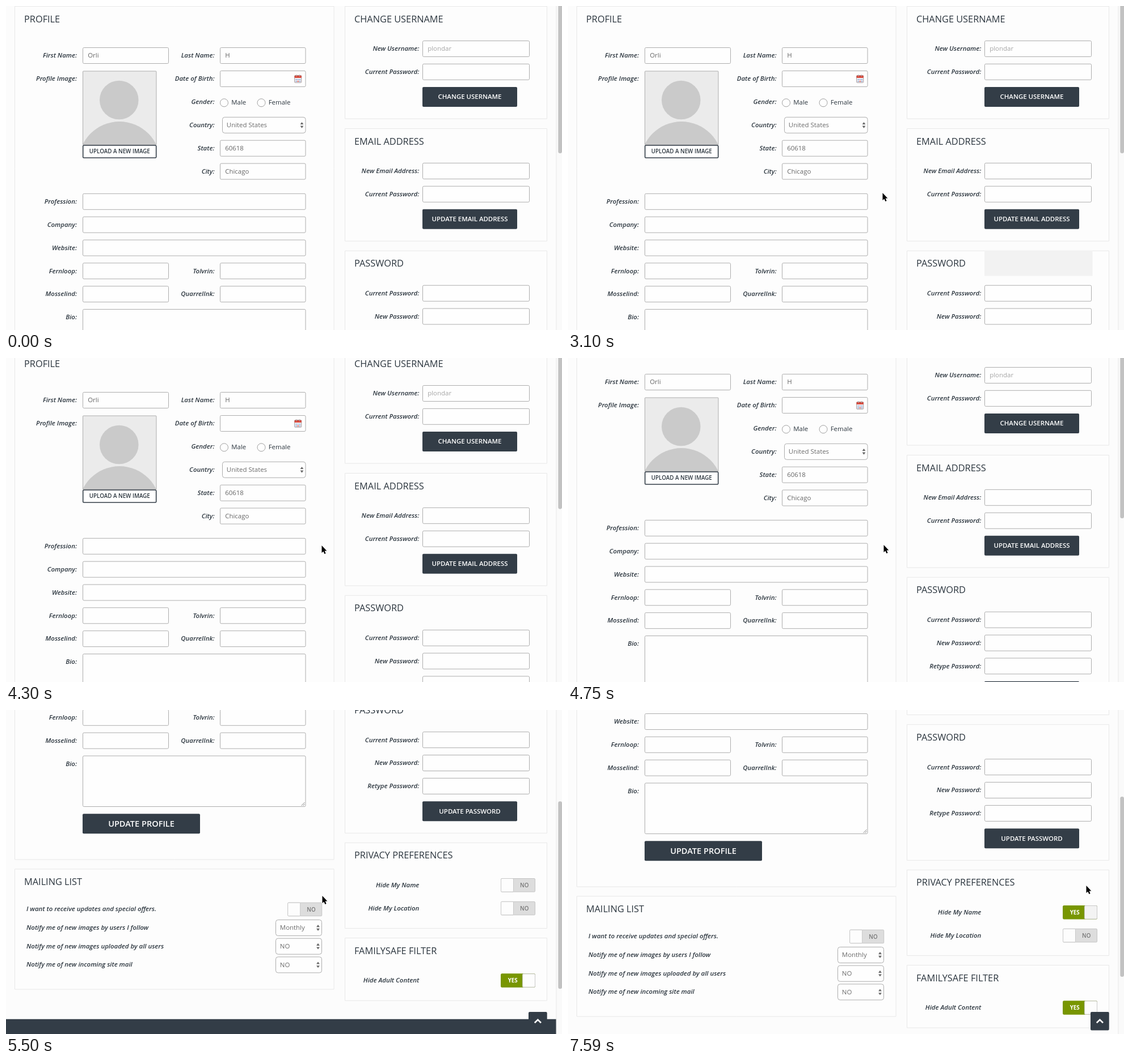
Write an HTML page with a canvas that moves like this. It is 980 px wide and 572 px high and loops after 8 s.

```html
<!DOCTYPE html>
<html lang="en">
<head>
<meta charset="utf-8">
<title>Account settings</title>
<style>
html, body { margin: 0; width: 980px; height: 572px; overflow: hidden; background: #fcfcfc; }
canvas { display: block; }
</style>
</head>
<body>
<canvas id="stage" width="980" height="572"></canvas>
<script>
const ctx = document.getElementById('stage').getContext('2d');
const LOOP = 8000;
const FONT = '"Open Sans", "Noto Sans", sans-serif';
const INK = '#2b353e', DARK = '#333d47', LINE = '#adadad', PANEL = '#e8e8e8', GREEN = '#789600';
const BODY = 11.44, PITCH = 40.85;

// time, pointer x, pointer y, scroll
const poses = [
  [0, -50, -50, 0],
  [450, 905, 460, 0], [600, 735, 400, 0], [750, 440, 352, 0], [900, 147, 291, 0],
  [1050, 136, 80, 0], [1200, 288, 188, 0], [1340, 440, 250, 0], [1480, 535, 300, 0],
  [1630, 628, 250, 0], [1780, 668, 200, 0], [1920, 691, 170, 0], [2060, 800, 110, 0],
  [2210, 910, 76, 0], [2350, 700, 260, 0], [2500, 400, 350, 0], [2650, 542, 301, 0],
  [2800, 547, 312, 0], [2950, 552, 324, 0], [3100, 554, 330, 0],
  [3550, 555, 331, 3], [3700, 555, 331, 6.5],
  [4150, 556, 331, 9.5], [4300, 556, 331, 13],
  [4750, 556, 330, 45], [5050, 557, 330, 100], [5200, 557, 329, 157],
  [5500, 557, 328, 454.5],
  [6550, 620, 326, 454.5], [6700, 730, 320, 454.5], [6850, 830, 313, 454.5],
  [7000, 895, 310, 454.5], [7150, 913, 310, 454.5], [7290, 913, 310, 454.5],
  [7440, 913, 310, 435], [7590, 913, 310, 406.5]
];

function text(str, x, y, { size = BODY, weight = 400, italic = false, color = INK, align = 'left' } = {}) {
  ctx.font = `${italic ? 'italic ' : ''}${weight} ${size}px ${FONT}`;
  ctx.textAlign = align;
  ctx.fillStyle = color;
  ctx.fillText(str, x, y);
}

function box(x, y, w, h, { r = 2, fill, stroke, width = 1 } = {}) {
  ctx.beginPath();
  ctx.roundRect(x, y, w, h, r);
  if (fill) { ctx.fillStyle = fill; ctx.fill(); }
  if (stroke) { ctx.strokeStyle = stroke; ctx.lineWidth = width; ctx.stroke(); }
}

function path(points, close) {
  ctx.beginPath();
  points.forEach(([x, y]) => ctx.lineTo(x, y));
  if (close) ctx.closePath();
}

function disc(x, y, r) {
  ctx.beginPath();
  ctx.arc(x, y, r, 0, Math.PI * 2);
}

const panel = (x, y, w, h) => box(x, y, w, h, { r: 0, fill: '#fdfdfd', stroke: PANEL });
const heading = (str, x, y) => text(str, x, y, { size: 16.34 });
const label = (str, x, y, align = 'right') => text(str, x, y, { weight: 600, italic: true, align });

function field(x, y, w, value = '', color = '#666') {
  box(x, y, w, 28, { fill: '#fefefe', stroke: LINE });
  text(value, x + 8.7, y + 17.8, { color });
}

function row(name, right, x, y, w, value, color) {
  label(name, right, y + 17.8);
  field(x, y, w, value, color);
}

function button(str, x, y, w, size = BODY) {
  box(x, y, w, 35, { fill: DARK });
  text(str, x + w / 2, y + 17.3 + size * 0.36, { size, weight: 600, color: '#fff', align: 'center' });
}

function select(x, y, w, value) {
  box(x, y, w, 28, { r: 4, fill: '#fefefe', stroke: LINE });
  text(value, x + 7.3, y + 17.6, { color: '#6b6b6b' });
  const cx = x + w - 6.5, cy = y + 14;
  ctx.fillStyle = '#666';
  for (const d of [-1, 1]) {
    path([[cx - 2.9, cy + d * 1.3], [cx + 2.9, cy + d * 1.3], [cx, cy + d * 5.4]], true);
    ctx.fill();
  }
}

// on runs from 0 (NO) to 1 (YES)
function toggle(x, y, on, knob = '#fdfdfd') {
  const yes = on > 0.5;
  box(x, y, 60, 23.5, { r: 1.5, fill: yes ? GREEN : '#dddddd', stroke: yes ? GREEN : '#c4c4c4' });
  text(yes ? 'YES' : 'NO', x + (yes ? 20.7 : 41.3), y + 15.5,
    { size: 9.8, weight: yes ? 700 : 600, color: yes ? '#fff' : '#777', align: 'center' });
  box(x + on * 38, y, 22, 23.5, { r: 1.5, fill: knob, stroke: '#c8c8c8' });
}

function avatar() {
  ctx.save();
  box(135.5, 115, 129.5, 130, { r: 1, fill: '#ebebeb' });
  ctx.clip();
  ctx.fillStyle = '#cacaca';
  disc(199.3, 166, 34.3);
  ctx.fill();
  disc(200, 276, 72);
  ctx.fill();
  ctx.restore();
  box(135.5, 115, 129.5, 130, { r: 1, stroke: LINE });
  box(135.7, 246, 129, 22, { r: 1.5, fill: '#fff', stroke: DARK, width: 1.6 });
  text('UPLOAD A NEW IMAGE', 200.3, 260.2, { size: 9.8, weight: 600, align: 'center' });
}

function calendar(x, y) {
  box(x, y, 12, 12.5, { r: 1, fill: '#fff', stroke: '#9a8f94' });
  box(x, y, 12, 4.3, { r: 1, fill: '#d9483b' });
  for (const dx of [2.5, 8]) box(x + dx, y - 1.3, 1.5, 3.2, { r: 0, fill: '#a9a0a0' });
  for (let i = 0; i < 6; i++) {
    const fill = i === 4 ? '#d9483b' : '#8297c4';
    box(x + 1.8 + (i % 3) * 3.2, y + 6 + Math.floor(i / 3) * 3.2, 2.1, 2, { r: 0, fill });
  }
}

function profile() {
  panel(15.5, 0.5, 562.5, 718);
  heading('PROFILE', 32, 28.5);
  row('First Name:', 125, 135.5, 73.5, 151, 'Orli');
  label('Profile Image:', 125, 132.3);
  avatar();

  row('Last Name:', 367.5, 377.5, 73.5, 150.5, 'H');
  row('Date of Birth:', 367.5, 377.5, 114.5, 150.5);
  calendar(508.7, 122.7);
  label('Gender:', 367.5, 173.2);
  [['Male', 384.5], ['Female', 450]].forEach(([name, x]) => {
    disc(x, 170.8, 7);
    ctx.fillStyle = '#fefefe';
    ctx.fill();
    ctx.strokeStyle = '#a0a0a0';
    ctx.lineWidth = 1;
    ctx.stroke();
    text(name, x + 12.7, 174);
  });
  label('Country:', 367.5, 214);
  select(381.5, 196.3, 146.5, 'United States');
  row('State:', 367.5, 377.5, 237.2, 150.5, '60618');
  row('City:', 367.5, 377.5, 278, 150.5, 'Chicago');

  ['Profession:', 'Company:', 'Website:'].forEach((name, i) =>
    row(name, 125, 135.5, 331.3 + i * PITCH, 392.5));
  [['Fernloop:', 'Tolvrin:'], ['Mosselind:', 'QuarrelInk:']].forEach(([a, b], i) => {
    const y = 453.8 + i * PITCH;
    row(a, 125, 135.5, y, 151);
    row(b, 367.5, 377.5, y, 150.5);
  });

  label('Bio:', 125, 553.3);
  box(135.5, 535.5, 392.5, 89.5, { fill: '#fefefe', stroke: LINE });
  ctx.strokeStyle = '#888';
  for (const d of [6, 3]) {
    path([[526.5 - d, 623.5], [526.5, 623.5 - d]]);
    ctx.stroke();
  }
  button('UPDATE PROFILE', 135, 637.7, 207, 14.55);
}

function mailing() {
  panel(15.5, 735.3, 562.5, 212.2);
  heading('MAILING LIST', 32, 763.5);
  ['I want to receive updates and special offers.',
   'Notify me of new images by users I follow',
   'Notify me of new images uploaded by all users',
   'Notify me of new incoming site mail'
  ].forEach((str, i) => label(str, 36, 809.8 + i * 32.7, 'left'));
  toggle(496.7, 794.7, 0);
  ['Monthly', 'NO', 'NO'].forEach((v, i) => select(475.5, 825 + i * 32.7, 81, v));
}

function sidebar(t) {
  const sub = (name, y, value, color) => row(name, 728.3, 734.5, y, 188, value, color);
  panel(597.5, 0.5, 356, 198.5);
  heading('CHANGE USERNAME', 614, 28.5);
  sub('New Username:', 61.5, 'plondar', '#a5a5a5');
  sub('Current Password:', 102.3);
  button('CHANGE USERNAME', 734, 143, 167);

  panel(597.5, 216.5, 356, 198.5);
  heading('EMAIL ADDRESS', 614, 244.5);
  sub('New Email Address:', 277.3);
  sub('Current Password:', 318.2);
  button('UPDATE EMAIL ADDRESS', 734, 358.8, 167);

  panel(597.5, 432.2, 356, 239.6);
  if (t >= 900 && t < 3550) box(734, 432, 190.5, 44.5, { r: 0, fill: '#f2f2f2' });
  heading('PASSWORD', 614, 460);
  ['Current Password:', 'New Password:', 'Retype Password:'].forEach((name, i) =>
    sub(name, 493.2 + i * PITCH));
  button('UPDATE PASSWORD', 734, 615.7, 167);

  panel(597.5, 688.8, 356, 151.2);
  heading('PRIVACY PREFERENCES', 614, 716.5);
  label('Hide My Name', 728.3, 767.6);
  label('Hide My Location', 728.3, 767.6 + PITCH);
  const on = t < 7150 ? 0 : t < 7290 ? 0.55 : 1;
  toggle(872.5, 752, on, t < 7000 ? '#fdfdfd' : '#f3f3f3');
  toggle(872.5, 752 + PITCH, 0);

  panel(597.5, 857, 356, 110.5);
  heading('FAMILYSAFE FILTER', 614, 885.5);
  label('Hide Adult Content', 728.3, 935.9);
  toggle(872.5, 920.3, 1);
}

function topButton() {
  box(921, 533, 32.7, 32.5, { fill: DARK });
  path([[931.8, 552.3], [937.4, 546.8], [943, 552.3]]);
  ctx.strokeStyle = '#fff';
  ctx.lineWidth = 2.6;
  ctx.stroke();
}

function scrollbar(scroll, t) {
  box(970, -1, 12, 574, { r: 0, fill: '#fafafa', stroke: PANEL });
  const bottom = t < 7590 ? 260 + scroll * 0.511 : 471;
  const top = t < 7590 ? bottom - 331 : 153;
  box(973.3, top, 6.7, bottom - top, { r: 3.3, fill: '#c2c2c2' });
}

function pointer(x, y) {
  ctx.save();
  ctx.translate(x, y);
  path([[0.5, 0], [0.5, 13], [3.4, 10.4], [5.4, 15], [7.6, 14], [5.6, 9.6], [9.4, 9.4]], true);
  ctx.lineJoin = 'round';
  ctx.strokeStyle = '#fff';
  ctx.lineWidth = 1.8;
  ctx.stroke();
  ctx.fillStyle = '#000';
  ctx.fill();
  ctx.restore();
}

function draw(t) {
  const [, x, y, scroll] = poses.findLast(p => p[0] <= t);
  ctx.fillStyle = '#fcfcfc';
  ctx.fillRect(0, 0, 980, 572);
  ctx.save();
  ctx.translate(0, -scroll);
  profile();
  mailing();
  sidebar(t);
  box(0, 1000.3, 970, 200, { r: 0, fill: DARK });
  ctx.restore();
  if (scroll > 120) topButton();
  scrollbar(scroll, t);
  pointer(x, y);
}

const start = performance.now();
function tick() {
  draw((performance.now() - start) % LOOP);
  requestAnimationFrame(tick);
}
tick();
</script>
</body>
</html>
```
